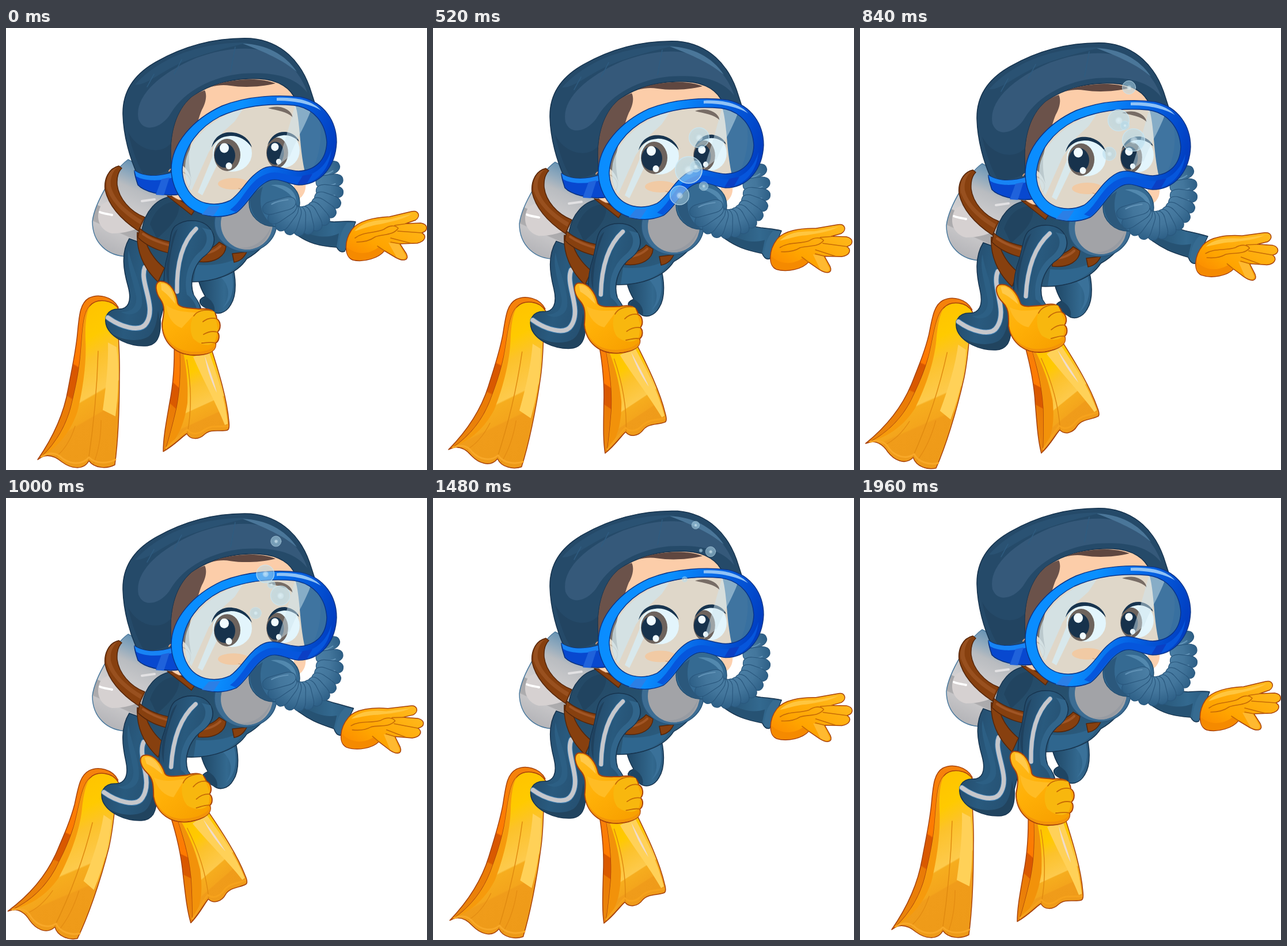
An HTML page for the animation above (2 s loop, 731 by 766 pixels).

```html
<!DOCTYPE html>
<html lang="en">
<head>
<meta charset="utf-8">
<title>Diver</title>
<style>
  html, body { margin: 0; width: 100%; height: 100%; overflow: hidden; background: #fff; }
  svg { display: block; width: 731px; height: 766px; }
</style>
</head>
<body>
<svg id="stage" viewBox="0 0 731 766" fill="none" stroke-linejoin="round" stroke-linecap="round">
  <defs>
    <linearGradient id="fin" x1=".35" y1="0" x2=".62" y2="1">
      <stop offset="0" stop-color="#ffc000"/><stop offset=".27" stop-color="#ffca00"/>
      <stop offset=".4" stop-color="#fcc22c"/><stop offset=".6" stop-color="#fdca4c"/>
      <stop offset=".61" stop-color="#f6ad1e"/><stop offset=".72" stop-color="#f4a51c"/>
      <stop offset=".73" stop-color="#f09c1a"/><stop offset="1" stop-color="#ee9a18"/>
    </linearGradient>
    <linearGradient id="finBack" x1=".6" y1="0" x2=".3" y2="1">
      <stop offset="0" stop-color="#f5820c"/><stop offset=".42" stop-color="#ff7a00"/>
      <stop offset=".43" stop-color="#d95700"/><stop offset=".62" stop-color="#d95a00"/>
      <stop offset=".63" stop-color="#ea7a05"/><stop offset="1" stop-color="#ea850c"/>
    </linearGradient>
    <linearGradient id="tank" x1=".7" y1="0" x2=".3" y2="1">
      <stop offset="0" stop-color="#4a83ad"/><stop offset=".22" stop-color="#8fa9bd"/>
      <stop offset=".34" stop-color="#b9bcc0"/><stop offset=".62" stop-color="#d2d0d1"/>
      <stop offset=".63" stop-color="#a7a6a8"/><stop offset=".78" stop-color="#adacae"/>
      <stop offset=".79" stop-color="#c6c5c7"/><stop offset="1" stop-color="#b4b4b8"/>
    </linearGradient>
    <linearGradient id="rim" x1="0" y1=".4" x2="1" y2=".6">
      <stop offset="0" stop-color="#0a8cff"/><stop offset=".35" stop-color="#0a90ff"/>
      <stop offset=".62" stop-color="#0668e8"/><stop offset="1" stop-color="#0038bc"/>
    </linearGradient>
    <linearGradient id="suit" x1="0" y1="0" x2="1" y2="1">
      <stop offset="0" stop-color="#234764"/><stop offset=".5" stop-color="#27516f"/>
      <stop offset="1" stop-color="#2f668e"/>
    </linearGradient>
    <linearGradient id="limb" x1="0" y1="0" x2="1" y2=".4">
      <stop offset="0" stop-color="#214462"/><stop offset=".55" stop-color="#295a7e"/>
      <stop offset="1" stop-color="#254f70"/>
    </linearGradient>
    <linearGradient id="farLimb" x1="0" y1="0" x2="1" y2="0">
      <stop offset="0" stop-color="#1f4766"/><stop offset=".7" stop-color="#33698f"/>
      <stop offset="1" stop-color="#2a5b80"/>
    </linearGradient>
    <linearGradient id="ridge" x1="0" y1="0" x2="0" y2="1">
      <stop offset="0" stop-color="#4b7fa5"/><stop offset=".5" stop-color="#43769c"/>
      <stop offset="1" stop-color="#2d5f86"/>
    </linearGradient>
    <linearGradient id="glove" x1=".2" y1="0" x2=".7" y2="1">
      <stop offset="0" stop-color="#ffba1c"/><stop offset=".5" stop-color="#ffb007"/>
      <stop offset="1" stop-color="#f8a000"/>
    </linearGradient>
    <linearGradient id="palm" x1="0" y1=".9" x2=".8" y2="0">
      <stop offset="0" stop-color="#fb8800"/><stop offset=".35" stop-color="#ffa400"/>
      <stop offset="1" stop-color="#ffb91c"/>
    </linearGradient>
    <radialGradient id="bubble">
      <stop offset="0" stop-color="#dff3fa" stop-opacity=".75"/>
      <stop offset=".4" stop-color="#b0d9ec" stop-opacity=".55"/>
      <stop offset="1" stop-color="#b4dcee" stop-opacity=".5"/>
    </radialGradient>
    <clipPath id="lensClip"><path id="lensShape"/></clipPath>
  </defs>
</svg>
<script>
const NS = 'http://www.w3.org/2000/svg';
const stage = document.getElementById('stage');
const clamp = (v, lo = 0, hi = 1) => Math.min(hi, Math.max(lo, v));

function make(tag, attrs, parent) {
  const el = document.createElementNS(NS, tag);
  for (const k in attrs) el.setAttribute(k, attrs[k]);
  return parent.appendChild(el);
}
const group = (parent = stage, attrs = {}) => make('g', attrs, parent);
function path(g, d, fill = 'none', stroke = 'none', width = 1.5) {
  return make('path', { d, fill, stroke, 'stroke-width': width }, g);
}
function oval(g, cx, cy, rx, ry, fill, extra = {}) {
  return make('ellipse', { cx, cy, rx, ry, fill, ...extra }, g);
}

// Bending parts: every point of a path goes through bend(x, y, q).
const bent = [];
function bendable(bend, shapes) {
  const g = group();
  for (const s of shapes) bent.push({ el: path(g, ...s), d: s[0], bend });
}
function bendPath({ el, d, bend }, q) {
  el.setAttribute('d', d.replace(/(-?[\d.]+),(-?[\d.]+)/g, (_, x, y) =>
    bend(+x, +y, q).map(v => v.toFixed(2)).join(',')));
}

const NAVY = '#17344f', RUST = '#a8430c', GREY = '#c6c7cb', TRIM = '#4382b4';
const BROWN = '#87400f', BROWN_EDGE = '#56260a';

const bendLeftFin = (x, y, q) => {
  const u = clamp((y - 470) / 287, 0, 1.1);
  return [x - q * u ** 1.6 * (57 - (190 - x) * .07),
          y + q * (u * ((x - 190) * .26 + 6) + (1 - u) * 4)];
};
const bendLeg = (x, y, q) => [x - q * 6 * clamp((y - 380) / 120), y + 7 * q];
const bendArm = (x, y, q) => [x - q * 9 * clamp((y - 340) / 110), y + 8 * q];
const bendReach = (x, y, q) => {
  const u = clamp((x - 500) / 100) ** 2;
  return [x - q * u * (8 + .1 * (y - 385)), y + q * (8 + 17 * u)];
};

// Far arm with its open hand
bendable(bendReach, [
  ['M480,322 C515,322 545,335 570,336 C586,335 600,334 607,336 L588,387 C582,390 578,387 574,380 C545,378 525,374 500,355 Z', 'url(#farLimb)', NAVY],
  ['M515,352 C540,364 560,364 578,356 L574,379 C550,378 528,373 508,360 Z', '#265273'],
  ['M592,338 C582,350 577,368 578,384 L588,386 L606,337 Z', '#366b91'],
]);
const openHand = group();
path(openHand, 'M600,350 C611,334 640,328 666,327 L704,318 C716,315 721,326 711,333 L694,339 L720,338 C733,340 734,351 722,355 C731,360 728,370 714,373 L684,374 L695,391 C701,403 690,405 677,398 L657,386 C648,398 622,407 602,402 C588,396 586,371 600,350 Z', 'url(#palm)', RUST);
path(openHand, 'M592,380 C590,395 598,402 610,402 C632,403 648,396 657,385 L648,379 C632,392 610,395 592,380 Z', '#f58a00');
path(openHand, 'M605,352 C620,336 640,333 664,332 L705,322 C690,332 670,335 650,340 C632,342 615,350 605,352 Z', '#ffc63f');
path(openHand, 'M664,372 L682,374 L694,395 C694,402 686,402 678,397 Z', '#ffb930');
path(openHand, 'M606,364 C620,353 640,356 656,349 C665,342 676,341 681,347 C672,360 655,357 641,362 C630,370 616,371 609,371 M675,342 L696,339 M680,352 L722,355 M668,364 L703,373 M657,386 L645,378 M684,374 L668,371', 'none', '#c66b06', 1.6);

// Far leg
const farLeg = group();
path(farLeg, 'M334,436 L392,406 C399,430 402,462 390,480 C382,494 366,500 354,488 C334,481 331,471 346,465 C340,455 336,445 334,436 Z', 'url(#farLimb)', NAVY);
path(farLeg, 'M346,465 C356,470 364,480 362,492 C352,490 330,480 346,465 Z', '#1f4563');
path(farLeg, 'M371,430 C388,445 391,465 377,484 C396,470 398,440 390,418 Z', '#3a7199');

// Air tank
const tank = group();
path(tank, 'M212,228 C190,243 154,302 150,335 C150,372 176,396 212,396 L245,375 L300,300 L245,245 Z', 'url(#tank)', '#4c7a9e');
path(tank, 'M166,306 C154,325 160,350 184,356 C206,356 226,350 238,342 C205,330 185,318 177,300 Z', '#d6d1d1');
path(tank, 'M163,319 C170,322 176,322 184,324', 'none', '#fff', 4);
path(tank, 'M236,300 L258,297', 'none', '#e2e1e3', 4);
path(tank, 'M196,239 C178,243 170,262 172,280 C178,307 200,332 230,352 L241,328 C215,318 196,295 193,272 C192,258 196,248 201,243 Z', BROWN, BROWN_EDGE);
path(tank, 'M194,241 C178,246 173,262 175,278 C183,301 203,322 233,340 L236,333 C210,318 188,298 182,274 C180,260 186,247 194,241 Z', '#98501f');

bendable(bendLeftFin, [
  ['M195,484 C185,465 160,460 144,468 C128,477 127,500 124,530 C121,562 114,592 108,625 C100,672 80,712 55,748 C75,735 85,735 92,742 L150,640 Z', 'url(#finBack)', RUST],
  ['M196,488 C185,470 158,468 146,481 C132,495 133,530 129,570 C126,600 121,622 114,652 C105,690 86,720 62,743 C78,737 90,746 97,752 C112,763 134,768 144,750 C154,764 176,764 189,757 C194,720 197,660 197,600 C198,560 194,530 194,500 Z', 'url(#fin)', RUST],
  ['M146,481 C132,495 133,530 129,570 C126,600 121,622 114,652 C105,690 86,720 62,743 C92,724 112,700 124,665 C135,620 140,575 138,540 C137,510 140,492 146,481 Z', '#f69a0c'],
  ['M177,545 C178,580 174,620 168,662 L190,673 C196,630 196,590 192,553 Z', '#ffd158'],
  ['M160,560 C158,630 152,690 143,750', 'none', '#e08a10', 1.5],
  ['M165,680 C165,710 160,735 152,755 M120,690 C112,715 100,732 88,742', 'none', '#e48c12', 1.3],
  ['M62,743 C78,733 90,738 98,746 C112,756 132,758 144,744 C156,756 176,755 190,748', 'none', '#f8a828', 3],
]);

bendable(bendLeg, [
  ['M214,365 C199,390 204,420 212,448 C219,474 212,488 195,487 C176,487 169,502 175,518 C184,538 214,552 242,551 C261,550 270,536 268,505 L285,440 L255,380 Z', 'url(#limb)', NAVY],
  ['M184,530 C205,543 232,544 247,535 C259,526 262,508 264,490 C273,535 262,550 241,550 C215,550 196,542 184,530 Z', '#21445f'],
  ['M213,385 C208,410 222,440 226,465 C228,485 216,493 200,492 C212,500 233,497 236,478 C238,448 218,415 213,385 Z', '#2c5f84'],
  ['M241,415 C231,440 262,482 244,511 C233,530 196,516 177,502', 'none', TRIM, 9.5],
  ['M241,415 C231,440 262,482 244,511 C233,530 196,516 177,502', 'none', GREY, 7.5],
]);

const rightFin = group();
path(rightFin, 'M292,545 C293,590 290,620 284,650 C278,685 273,710 273,734 C290,725 302,712 315,702 L330,600 L335,545 Z', 'url(#finBack)', RUST);
path(rightFin, 'M302,545 C304,600 302,630 296,660 C289,690 282,715 277,731 C293,722 303,710 314,703 C320,714 335,714 345,704 C356,694 372,700 384,697 C388,696 388,690 387,682 C384,645 371,600 353,545 Z', 'url(#fin)', RUST);
path(rightFin, 'M302,555 C304,600 302,630 296,660 C289,690 282,715 277,731 C299,711 309,688 315,650 C317,610 312,580 306,555 Z', '#f2920a');
path(rightFin, 'M325,570 C342,610 365,650 380,688 L385,686 C382,650 369,608 352,560 Z', '#ffd158');
path(rightFin, 'M345,568 C353,590 362,615 366,632 C360,620 350,598 345,568 Z', '#f1dccb');
path(rightFin, 'M314,575 C322,620 322,665 315,702', 'none', '#e08a10', 1.5);
path(rightFin, 'M278,728 C292,716 303,705 315,696 C322,706 335,704 345,696 C358,687 372,692 385,690', 'none', '#f6a21c', 3);

// Torso and harness
const body = group();
path(body, 'M236,350 C240,320 262,292 292,292 L400,305 L466,345 C456,372 436,390 418,400 C400,428 360,440 322,440 L265,438 C242,410 230,380 236,350 Z', 'url(#suit)', NAVY);
path(body, 'M330,410 C365,414 395,405 414,393 C402,424 366,438 326,439 Z', '#2f668e');
path(body, 'M250,340 C258,315 275,300 300,300 C305,325 285,345 262,365 Z', '#214460');
const band = d => path(body, d, BROWN, BROWN_EDGE);
band('M280,291 L294,293 L328,315 L322,324 Z');
band('M228,354 C226,385 238,416 264,440 L275,416 C258,402 246,385 241,364 Z');
band('M232,347 C252,365 280,370 310,376 L310,396 C280,390 250,384 229,363 Z');
band('M333,386 C350,386 362,380 370,371 L382,378 C381,395 364,408 334,405 Z');
band('M393,391 L418,388 C414,397 407,404 396,406 Z');
path(body, 'M238,357 C258,371 285,377 306,382 M336,392 C350,392 364,386 372,378', 'none', '#a05525', 4);
oval(body, 416, 338, 54, 50, '#3d6d93', { stroke: '#28557a', 'stroke-width': 1.5 });
oval(body, 418, 339, 45, 45, '#a2a3a7');
path(body, 'M400,380 C425,384 448,372 460,345 L462,330 C462,362 440,385 418,384 Z', '#979ba2');

bendable(bendArm, [
  ['M294,343 C315,328 345,332 356,350 C368,368 360,384 341,398 C325,414 318,440 326,463 C336,478 345,488 332,502 L291,500 C272,475 270,430 281,392 C286,370 284,352 294,343 Z', 'url(#limb)', NAVY],
  ['M340,346 C354,360 350,378 334,390 C318,405 308,430 314,462 C325,470 330,480 332,490 C342,485 330,470 324,460 C317,438 325,412 341,397 C360,384 365,368 356,350 Z', '#31658b'],
  ['M298,348 C288,375 280,410 284,450 C276,430 277,405 285,385 C288,370 288,356 298,348 Z', '#1f415e'],
  ['M330,348 C305,372 296,410 297,457', 'none', TRIM, 8.5],
  ['M330,348 C305,372 296,410 297,457', 'none', GREY, 7],
]);

// Thumbs-up glove
const thumb = group();
path(thumb, 'M267,439 C257,442 260,459 268,470 C276,481 275,492 271,512 C271,542 291,566 326,567 C351,567 366,560 364,546 C370,543 372,532 367,527 C374,521 373,508 366,504 C365,490 354,485 335,487 C320,485 301,486 298,477 C296,460 286,438 267,439 Z', 'url(#glove)', RUST, 2);
path(thumb, 'M272,515 C276,543 295,560 325,561 C345,562 360,557 364,547 C365,562 350,566 326,566 C293,565 272,542 272,515 Z', '#f39408');
path(thumb, 'M269,443 C283,441 292,460 294,478 C287,470 279,460 270,454 Z', '#ffc94a');
path(thumb, 'M278,480 C294,492 312,492 330,493 L305,520 C290,515 280,500 278,480 Z', '#ffbc24');
path(thumb, 'M326,499 C335,488 352,487 362,492 L364,502 L368,522 L364,540 C358,555 336,550 325,538 C318,525 320,508 326,499 Z', '#f8b70e');
path(thumb, 'M366,504 C356,501 348,504 342,509 M367,527 C356,524 348,528 343,531 M364,546 C354,543 347,546 340,546 M326,499 C332,490 345,487 358,490', 'none', '#c66b06', 1.8);

// Head
const head = group();
path(head, 'M280,240 C262,255 270,285 300,298 L330,300 L320,240 Z', '#fcd3b2', '#a8683f', 1);
path(head, 'M500,262 L520,268 C522,285 514,296 500,300 Z', '#fcd0ae');
path(head, 'M232,262 C214,226 204,185 203,150 C202,110 222,80 262,58 C310,31 362,16 425,18 C480,23 512,60 527,102 L540,142 L535,200 L510,250 L300,258 C270,256 245,258 232,262 Z', '#254a69', NAVY);
path(head, 'M230,158 C222,118 268,78 330,52 C390,30 450,28 490,60 C505,75 518,95 523,112 C500,82 460,76 410,79 C360,84 310,108 286,148 C272,172 240,184 230,158 Z', '#35597a');
path(head, 'M224,98 C270,48 340,25 420,25 C385,35 330,45 285,70 C262,82 240,100 224,98 Z', '#2a5273');
path(head, 'M411,27 C450,28 485,45 505,76 C480,55 450,42 411,27 Z', '#4a7699');
path(head, 'M257,80 L245,102 M305,55 L292,80 M398,33 L390,76', 'none', '#2f5c80', 1.5);
path(head, 'M212,180 C220,215 230,240 240,255 C262,256 285,250 290,235 L286,200 C270,220 230,215 212,180 Z', '#224461');
path(head, 'M288,245 C283,200 288,150 322,120 C355,95 400,86 440,88 C475,90 495,105 503,125 L515,170 L515,260 L320,270 Z', '#fccda9', NAVY);
path(head, 'M288,240 C284,200 288,150 322,120 C330,114 338,110 345,108 C349,115 348,128 340,142 C330,165 325,200 322,262 Z', '#6b524a');
path(head, 'M356,102 C385,88 440,84 468,96 C440,103 410,103 390,100 C378,98 368,99 356,102 Z', '#604740');
path(head, 'M283,248 C287,240 296,246 306,262 L318,282 L302,294', 'none', '#d69c77', 2);

path(head, 'M223,247 C240,259 266,258 290,250 L303,288 C275,293 240,284 229,272 C226,262 223,255 223,247 Z', '#0848cf', '#08307e');
path(head, 'M223,247 C240,259 266,258 290,250 L293,258 C270,266 240,266 226,257 Z', '#1784f5');
path(head, 'M270,262 L260,289 L274,290 L284,259 Z', '#1f62db');

// Breathing hose: ridges strung along a cubic curve
oval(head, 466, 303, 44, 41, '#356a92', { stroke: '#214d70', 'stroke-width': 1.5 });
path(head, 'M424,290 C420,320 440,345 466,343 C445,330 436,305 446,275 Z', '#2b587c');
path(head, 'M460,272 C490,268 506,285 504,305 C495,285 480,278 460,272 Z', '#5288ae');
const HOSE = [[474, 307], [488, 362], [586, 332], [557, 246]];
const hosePoint = s => [0, 1].map(k => {
  const [a, b, c, d] = HOSE.map(pt => pt[k]), r = 1 - s;
  return r ** 3 * a + 3 * r * r * s * b + 3 * r * s * s * c + s ** 3 * d;
});
const RIDGES = 12;
for (let i = RIDGES; i >= 0; i--) {
  const s = i / RIDGES, [x, y] = hosePoint(s), [x2, y2] = hosePoint(s + .01);
  const turn = Math.atan2(y2 - y, x2 - x) * 180 / Math.PI;
  const g = group(head, { transform: `translate(${x} ${y}) rotate(${turn})` });
  const ry = 23.5 + 6 * (1 - s) ** 3;
  make('rect', { x: -10, y: -ry, width: 22, height: 2 * ry, rx: 10, ry: 15, fill: 'url(#ridge)', stroke: '#2a587e', 'stroke-width': 1.2 }, g);
  path(g, `M-5,${-ry * .6} Q-8,0 -5,${ry * .4}`, 'none', '#6293b7', 2);
}

// Mask lens with the face behind it
const LENS = 'M306,245 C309,205 335,172 372,153 C410,136 455,130 500,134 C535,139 555,165 557,198 C556,230 536,247 508,248 C482,247 464,232 442,246 C418,261 409,286 389,299 C360,312 330,304 316,281 C308,268 306,257 306,245 Z';
const RIM = 'M287,245 C287,200 325,158 375,135 C420,117 475,115 513,120 C553,129 574,162 574,198 C572,242 545,272 508,272 C485,270 470,255 450,268 C430,280 418,308 400,320 C370,333 332,327 310,303 C295,287 287,265 287,245 Z';
document.getElementById('lensShape').setAttribute('d', LENS);
const lens = group(head, { 'clip-path': 'url(#lensClip)' });
path(lens, LENS, '#dfd7c9');
path(lens, 'M300,190 L328,180 C318,205 314,225 322,262 C316,245 308,238 300,235 Z', '#7c766f');
path(lens, 'M308,250 C318,255 324,265 318,275', 'none', '#c3b5a3', 2);
path(lens, 'M500,125 C512,160 508,200 519,250 L565,250 L565,130 Z', '#3f74a0');
path(lens, 'M535,135 C552,165 550,210 530,250 L565,250 L565,150 Z', '#3870a0');
path(lens, 'M312,230 C320,195 350,160 413,138 L397,162 L377,180 L352,215 L322,282 C312,270 309,250 312,230 Z', '#d0e5ec').setAttribute('opacity', .75);
path(lens, 'M363,212 L333,285 L341,290 L372,226 Z', '#d8e8ec');
oval(lens, 395, 270, 27, 10, '#f1caa4');
path(lens, 'M404,278 Q412,281 418,277', 'none', '#d5ab88', 1.5);

const open = group(lens), shut = group(lens);
function eye(cx, cy, rx, ry, ix, iy, k, lid) {
  oval(open, cx, cy, rx, ry, '#e3f5fc');
  oval(open, ix, iy, 23 * k, 28 * ry / 32, '#6d635d');
  oval(open, ix - 4 * k, iy + 1, 18 * k, 21 * ry / 32, '#17324c');
  oval(open, ix - 5 * k, iy - 12 * k, 8 * k, 8.5 * k, '#f1fbff');
  oval(open, ix + 3 * k, iy + 19 * k, 5.5 * k, 6 * k, '#f1fbff');
  path(open, lid, NAVY);
}
eye(393, 217, 34, 32, 384, 220, 1, 'M357,207 C362,186 378,179 394,181 C411,183 423,193 427,207 C416,192 402,186 389,187 C374,188 363,195 357,207 Z');
eye(482, 212, 28, 30, 471, 216, .82, 'M454,203 C460,186 472,179 486,180 C498,182 506,188 509,197 C500,188 490,185 481,186 C470,187 460,194 454,203 Z');
path(shut, 'M359,208 C372,190 398,190 413,201 C422,208 427,216 426,225 C421,211 411,203 399,200 C384,197 371,200 359,208 Z', NAVY);
path(shut, 'M453,216 C459,200 474,193 490,197 C501,201 508,207 510,214 C499,204 488,201 478,202 C467,204 459,209 453,216 Z', NAVY);
path(shut, 'M384,156 C392,146 406,144 419,147 C412,154 398,152 384,156 Z', '#756a64');
const brow = path(lens, 'M455,139 C470,133 494,137 498,155 C488,145 472,143 455,139 Z', '#776c65');

path(lens, 'M503,130 L531,138 C520,170 505,190 493,222 L470,240 L486,190 Z', '#cfe6ef').setAttribute('opacity', .5);

make('path', { d: RIM + LENS, fill: 'url(#rim)', 'fill-rule': 'evenodd', stroke: '#0a3488', 'stroke-width': 1.4 }, head);
path(head, 'M389,315 C414,297 420,265 452,253 C475,244 492,261 520,257 C542,251 558,235 565,210 C562,245 540,270 508,271 C485,269 470,255 449,267 C428,280 416,308 399,319 Z', '#0656dc');
path(head, 'M470,121 C500,119 532,125 547,143 C532,133 500,125 470,126 Z', '#8fc2f6');
path(head, 'M352,309 L340,323 L360,326 L372,308 Z', '#2b7fe6');
path(head, 'M515,256 L506,271 L522,270 L532,253 Z', '#0b3fc4');

// Bubbles: [ms, x, y, radius]
const TRACKS = [
  [[80, 455, 318, 0], [200, 458, 286, 14], [320, 460, 250, 21], [520, 462, 190, 18], [840, 467, 103, 12], [1200, 471, 40, 6], [1440, 474, 8, 0]],
  [[160, 458, 322, 0], [320, 453, 288, 17], [520, 444, 246, 24], [840, 449, 160, 19], [1200, 452, 96, 12], [1480, 456, 47, 7], [1800, 459, 8, 0]],
  [[400, 466, 305, 0], [520, 470, 274, 8], [660, 473, 238, 20], [840, 475, 194, 20], [1200, 478, 138, 14], [1480, 482, 93, 9], [1880, 486, 42, 0]],
  [[280, 426, 344, 0], [320, 426, 340, 2], [520, 428, 290, 17], [840, 433, 218, 12], [1200, 434, 176, 8], [1480, 437, 141, 5], [1800, 440, 108, 0]],
  [[280, 438, 314, 0], [320, 440, 306, 3], [520, 456, 240, 10], [840, 460, 169, 8], [1200, 462, 126, 6], [1480, 465, 91, 3], [1680, 467, 70, 0]],
];
const bubbles = TRACKS.map(track => {
  const g = group();
  make('circle', { r: .97, fill: 'url(#bubble)', stroke: '#c9e8f5', 'stroke-opacity': .8, 'stroke-width': .07 }, g);
  make('circle', { r: .3, cx: .04, cy: .04, fill: '#d9f0f8', 'fill-opacity': .35 }, g);
  return { g, track };
});
function placeBubble({ g, track }, t) {
  const i = track.findIndex(k => k[0] > t);
  if (i < 1) return g.setAttribute('display', 'none');
  const a = track[i - 1], b = track[i], f = (t - a[0]) / (b[0] - a[0]);
  const [, x, y, r] = a.map((v, k) => v + (b[k] - v) * f);
  g.setAttribute('display', r > .3 ? 'inline' : 'none');
  g.setAttribute('transform', `translate(${x} ${y}) scale(${r})`);
}

const LOOP = 2000, STEP = 40, HALF = 980;
const move = (g, value) => g.setAttribute('transform', value);

function draw(ms) {
  const t = Math.floor(ms % LOOP / STEP) * STEP;
  const q = (1 - Math.abs(t / HALF - 1)) * 7 / 6;
  for (const part of bent) bendPath(part, q);
  for (const g of [head, body]) move(g, `translate(0 ${8 * q})`);
  move(tank, `translate(0 ${7 * q})`);
  move(farLeg, `translate(${4 * q} ${8 * q})`);
  move(openHand, `translate(${-8 * q} ${25 * q}) rotate(${5.8 * q} 590 385)`);
  move(thumb, `translate(${-q} ${-3 * q}) rotate(${-9.8 * q} 308 586)`);
  move(rightFin, `rotate(${-14.5 * q} 305 571)`);

  const blink = t >= 240 && t < 440;
  open.setAttribute('display', blink ? 'none' : 'inline');
  shut.setAttribute('display', blink ? 'inline' : 'none');
  move(brow, `translate(${blink ? -3 : 0} ${blink ? 11 : 0})`);
  bubbles.forEach(b => placeBubble(b, t));
}

const start = performance.now();
function tick() {
  draw(performance.now() - start);
  requestAnimationFrame(tick);
}
tick();
</script>
</body>
</html>
```
